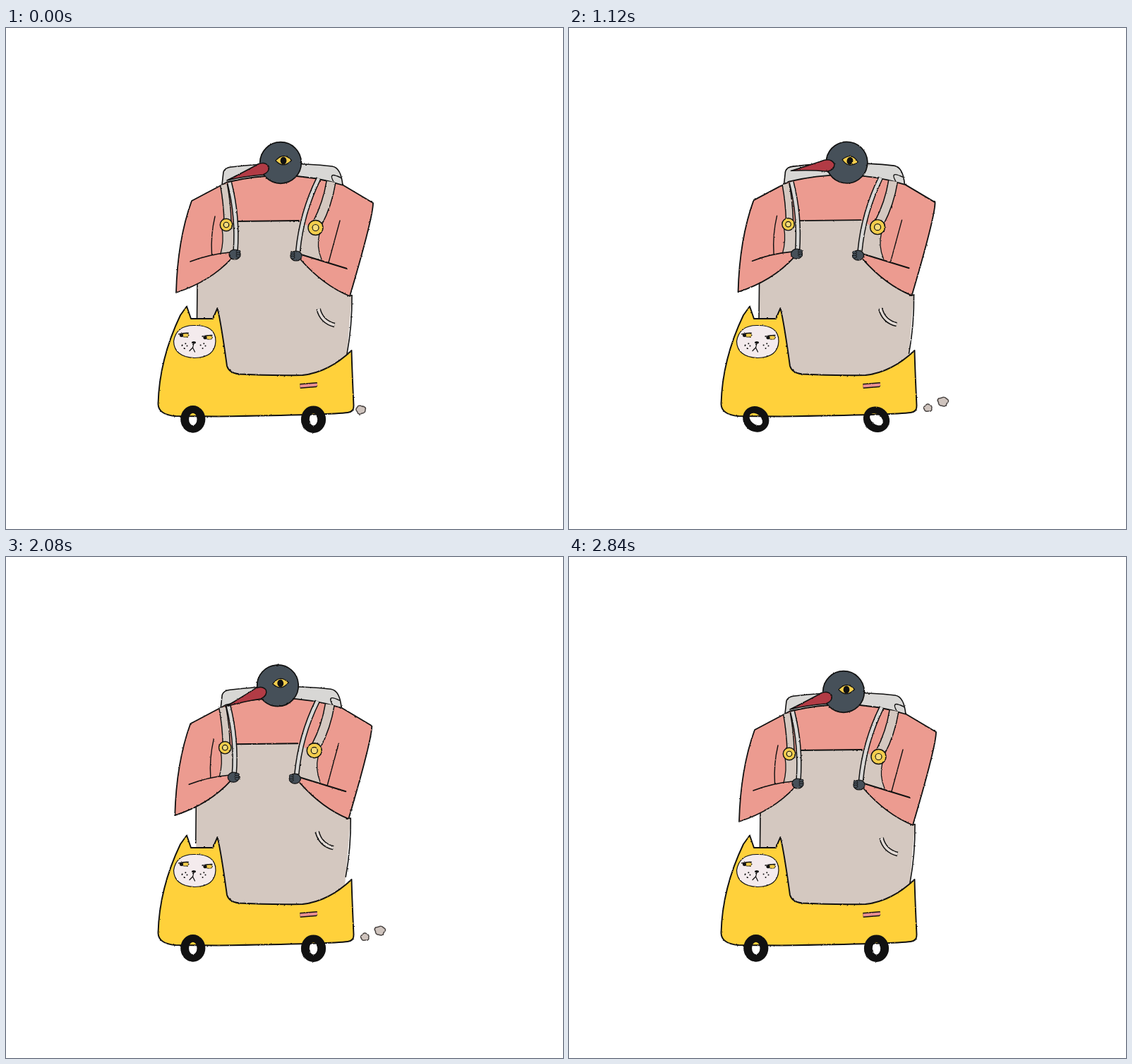
Animation, 789 px wide and 710 px high, one loop 2880 ms. Source, as an HTML page with a canvas:

```html
<!DOCTYPE html>
<html lang="en">
<head>
<meta charset="utf-8">
<title>Bird in a cat car</title>
<style>
  html, body { margin: 0; width: 100%; height: 100%; overflow: hidden; background: #fff; }
  canvas { display: block; filter: url(#rough); }
  svg { position: absolute; width: 0; height: 0; }
</style>
</head>
<body>
<canvas id="stage" width="789" height="710"></canvas>
<svg><filter id="rough" x="0" y="0" width="100%" height="100%" color-interpolation-filters="sRGB">
  <feTurbulence type="fractalNoise" baseFrequency="0.3" numOctaves="2" seed="4"/>
  <feDisplacementMap in="SourceGraphic" scale="2" xChannelSelector="R" yChannelSelector="G"/>
</filter></svg>
<script>
const ctx = document.getElementById('stage').getContext('2d');
const LOOP = 2880, TICK = 40, HOLD = 120, TAU = Math.PI * 2;
const INK = '#111', YELLOW = '#ffd13b', PINK = '#ec9b90', BEIGE = '#d4c8c0',
      GREY = '#d8d7d5', SLATE = '#465059', RED = '#b23b45', GOLD = '#f3cd4c';

const clamp = v => Math.min(1, Math.max(0, v));
// Smooth hill of height 1 around mid, zero beyond reach.
const hill = (v, mid, reach) => Math.cos(clamp(Math.abs(v - mid) / reach) * Math.PI / 2) ** 2;
const fade = (t, from, to) => 1 - hill(t, from, to - from) * (t < to) || 0;
const ramp = (t, from, to) => t <= from ? 0 : fade(t, from, to);

function paint(path, fill, width, color = INK) {
  if (fill) { ctx.fillStyle = fill; ctx.fill(path); }
  if (width) { ctx.lineWidth = width; ctx.strokeStyle = color; ctx.stroke(path); }
}

const shape = (d, fill, width) => paint(new Path2D(d), fill, width);

function oval(x, y, rx, ry, fill, width) {
  const path = new Path2D();
  path.ellipse(x, y, rx, ry, 0, 0, TAU);
  paint(path, fill, width);
}

// A line bowed sideways by bend at its middle.
function bow(x0, y0, x1, y1, bend) {
  const dx = x1 - x0, dy = y1 - y0, k = 2 * bend / Math.hypot(dx, dy);
  const path = new Path2D();
  path.moveTo(x0, y0);
  path.quadraticCurveTo((x0 + x1) / 2 - dy * k, (y0 + y1) / 2 + dx * k, x1, y1);
  return path;
}

const arc = (x0, y0, x1, y1, bend = 0, width = 1.6) => paint(bow(x0, y0, x1, y1, bend), null, width);

function strap(x0, y0, x1, y1, bend, width, fill) {
  const path = bow(x0, y0, x1, y1, bend);
  ctx.lineCap = 'butt';
  paint(path, null, width + 1.5);
  paint(path, null, width - 1.5, fill);
  ctx.lineCap = 'round';
}

function button(x, y, r) {
  oval(x, y, r, r, GOLD, 1.4);
  oval(x, y, r * .43, r * .43, '#f7dc7c', 1.2);
}

function hand(x, y, side) {
  oval(x, y, 8, 7, SLATE, 1.2);
  for (let i = -1; i < 2; i++) oval(x + side * 5, y - 1 + i * 3, 3, 2, SLATE, .8);
}

function drawBody() {
  shape('M306 222L308 204Q310 198 319 197Q390 188 462 196Q475 198 477 224V235H310Z', GREY, 1.6);
  arc(466, 221, 474, 212, -11, 1.4);

  shape('M271 362V520H478L483 460L490 379L440 320H318Z', BEIGE);
  arc(271, 363, 270.5, 414);
  arc(484, 380, 490, 379);
  arc(490, 379, 483, 462, -2);

  const right = 'M313 218.5Q400 198 478 223L520 248Q520 268 487 380Q450 365 418 329';
  const left = 'M320 326Q290 359 241 375Q243 300 263 245L313 218.5';
  shape(right + left.replace('M', 'L') + 'Z', PINK);
  shape(right + left, null, 1.8);

  shape('M326 274L415 273L444 290Q441 312 447 329L417 322L410 331H322L317 318L304 320Q309 300 306 282Z', BEIGE);
  arc(326, 274, 415, 273, 0, 1.9);
  arc(306, 284, 304, 320, -2, 1.3);
  arc(444, 291, 447, 328, 3, 1.3);

  strap(308.5, 222, 314, 274, -1, 10, BEIGE);
  strap(460.5, 218, 441, 277, -2.5, 13, BEIGE);
  strap(316.5, 219, 325, 317, -4, 6, GREY);
  strap(443, 213, 413.5, 317, 5, 6, GREY);
  button(312, 279, 8.7);
  button(438.5, 283, 10.5);

  arc(296, 267, 291.5, 321, 2, 1.4);
  arc(261, 331, 317, 318, -2);
  arc(473, 273, 457, 332, 0, 1.4);
  arc(418, 321, 483, 341, 0, 2.1);
  hand(324, 321, 1);
  hand(411, 323, -1);

  strap(442.5, 398, 465.5, 421, 5, 5, '#e2dad5');
}

function drawHead(tilt, blink) {
  ctx.save();
  ctx.translate(389, 226);
  ctx.rotate(tilt * Math.PI / 180);
  ctx.translate(-389, -226);
  oval(389, 191, 29.3, 29.3, SLATE, 1.7);
  if (blink) {
    arc(382, 189, 404, 188, 6.5, 1.9);
  } else {
    shape('M382 188Q393 175 404.5 187.5Q393 200 382 188Z', GOLD, 1.2);
    oval(393, 188, 4.4, 5.4, INK);
  }
  shape('M313 216Q339 203 357 193Q367 189 372 196Q374 204 364 208Q338 210 313 216Z', RED, 1.5);
  shape('M313 216L329 208Q327 211 313 216Z', INK);
  ctx.restore();
}

function drawEye(x, y, blink) {
  if (blink) return arc(x - 8, y - 1, x + 7, y - 1, 3.5, 1.6);
  oval(x + 1.5, y, 5, 2.8, GOLD, .8);
  oval(x - 4, y + .3, 2.6, 2.4, INK);
  arc(x - 8, y - 1.5, x + 6, y - 3, -.5, 1.3);
}

function drawCat(blink) {
  shape('M267 421.5Q297 421 297 444Q296 467 267 467.5Q238 466 237.5 444Q241 421 267 421.5Z', '#f4ebed', 1.2);
  drawEye(252.5, 435.3, blink);
  drawEye(286, 438.5, blink);
  oval(266, 445.7, 3, 1.7, INK);
  arc(266, 447, 264.5, 453, 0, 1.2);
  arc(264.5, 453, 260, 457.5, 0, 1.2);
  arc(264.5, 453, 267.5, 459, 0, 1.2);
  for (const x of [253, 279])
    for (let i = 0; i < 4; i++) oval(x + 3.5 * Math.cos(i * 1.7), 450.5 + 3.5 * Math.sin(i * 1.7), 1, 1, INK);
}

function drawCar(blink) {
  shape('M489.5 457Q490 480 492.5 535Q493 544 484 545Q465 548 300 550.5L240 550' +
        'Q216 548 215.5 533Q217 470 247 407L256 394.5L262 412H293L299.5 397Q305 420 313 479' +
        'Q316 489 330 490.5Q375 493 420 492Q457 488 489.5 457Z', YELLOW, 1.9);
  strap(416.5, 507.5, 441, 505.5, 0, 5.5, '#e98f91');
  drawCat(blink);
}

function drawWheel(x, y, step) {
  const turn = step * 65 * Math.PI / 180, wide = step ? 1.22 : 1;
  ctx.beginPath();
  ctx.ellipse(x, y, 17.6, 19.3, turn, 0, TAU);
  ctx.ellipse(x, y, 5.7 * wide, 8.7 * wide, turn, 0, TAU);
  ctx.fillStyle = INK;
  ctx.fill('evenodd');
}

function puff(x, y, r) {
  const path = new Path2D(), lobes = r > 15 ? 8 : 5;
  for (let a = 0; a < TAU; a += TAU / 48) {
    const k = r * (.84 + .16 * Math.abs(Math.sin(a * lobes / 2 + x)) + .06 * Math.cos(3 * a + y));
    path.lineTo(x + k * Math.cos(a), y + (k * .72 + 1) * Math.sin(a));
  }
  path.closePath();
  paint(path, '#cfc4be', 1.5, '#4a4543');
}

// Puffs appear one by one along a rising trail, then vanish from its start.
function drawSmoke(step) {
  if (step > 5) return;
  [.07, .25, .64, .88].forEach((place, i) => {
    if (i > step || i < step - 3) return;
    const u = place + .05 * (step - 3);
    const swell = 22 * hill(u, .52, .45) / (1 + .4 * Math.max(0, step - 3));
    puff(512 + 118 * u, 537 - 50 * u, Math.max(4, 7 - step) + swell);
  });
}

function draw(t) {
  ctx.fillStyle = '#fff';
  ctx.fillRect(0, 0, 789, 710);
  ctx.lineCap = ctx.lineJoin = 'round';

  const lean = ramp(t, 960, 1320) - ramp(t, 1880, 2280);
  const lift = 5 * hill(t, 680, 640) + 12.7 * hill(t, 2280, 560);
  const tilt = 10.5 * hill(t, 960, 960) - 3.8 * hill(t, 2100, 620);
  ctx.save();
  ctx.translate(-3.5 * lean, .6 * lean - lift);
  drawBody();
  drawHead(tilt, t >= 1320 && t < 1520);
  ctx.restore();

  drawCar(t >= 1720 && t < 1920);
  const step = Math.floor((t + 80) / 240) % 3;
  drawWheel(264.8, 554.4, step);
  drawWheel(435.5, 554.7, step);
  drawSmoke(Math.floor(t / HOLD) % 8);
}

function loop() {
  const t = performance.now() % LOOP;
  draw(Math.floor(t / TICK) * TICK);
  requestAnimationFrame(loop);
}
loop();
</script>
</body>
</html>
```
